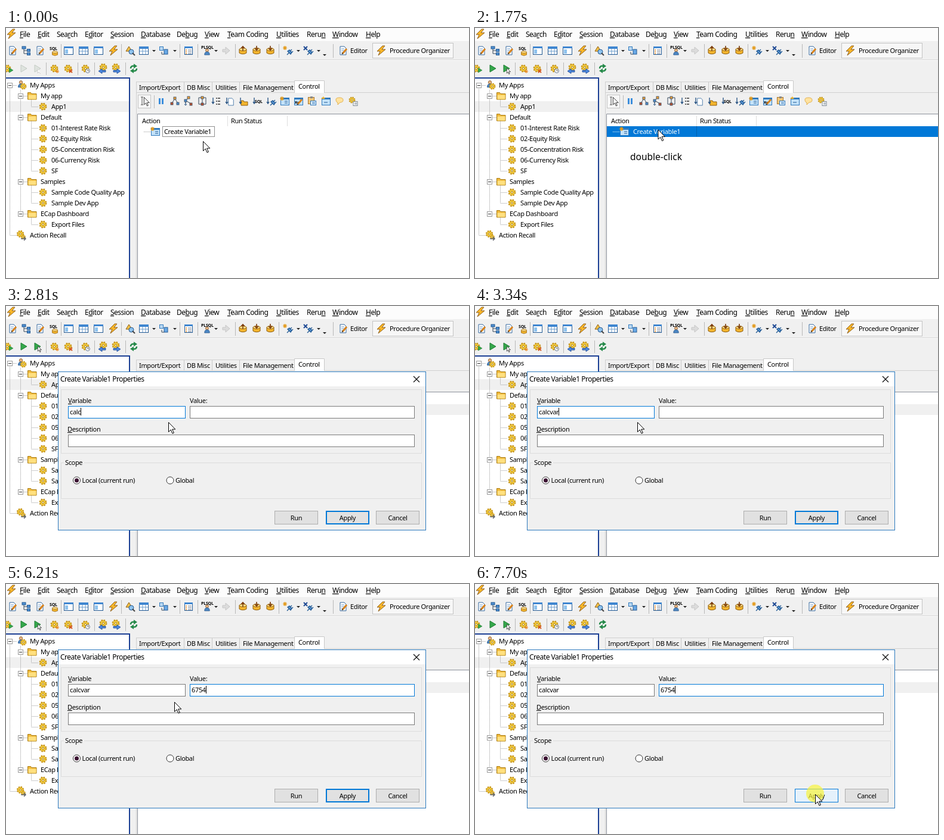
Write an HTML page that moves like this. It is 776 px wide and 420 px high and loops after 8 s.

```html
<!DOCTYPE html>
<html lang="en">
<head>
<meta charset="utf-8">
<title>Create variable</title>
<style>
  html, body { margin: 0; width: 100%; height: 100%; overflow: hidden; background: #f0f0f0; }
  svg { display: block; }
  text { font: 11px "Noto Sans", "Open Sans", sans-serif; letter-spacing: -.35px; white-space: pre; }
  .menu { font-size: 12px; letter-spacing: -.5px; }
  .note { font-size: 15.5px; letter-spacing: 0; }
  .tiny { font-size: 7px; font-weight: 700; letter-spacing: -.2px; }
  .u { text-decoration: underline; }
</style>
</head>
<body>
<svg id="stage" width="776" height="420" viewBox="0 0 776 420"></svg>
<script>
const LOOP = 8000;
const BLUE = '#0078d7', FACE = '#f0f0f0';

// ---- drawing helpers ----
const rect = (x, y, w, h, fill, stroke, extra = '') =>
  `<rect x="${x}" y="${y}" width="${w}" height="${h}" fill="${fill}" ${stroke ? `stroke="${stroke}"` : ''} ${extra}/>`;
const box = (x, y, w, h, fill, stroke, extra) => rect(x + .5, y + .5, w - 1, h - 1, fill, stroke, extra);
const path = (d, fill = 'none', stroke = 'none', width = 1, extra = '') =>
  `<path d="${d}" fill="${fill}" stroke="${stroke}" stroke-width="${width}" ${extra}/>`;
const disc = (x, y, r, fill, stroke = 'none') =>
  `<circle cx="${x}" cy="${y}" r="${r}" fill="${fill}" stroke="${stroke}"/>`;
// An ampersand in a label underlines the next letter.
const text = (x, y, label, extra = '') =>
  `<text x="${x}" y="${y}" ${extra}>${label.replace(/&(.)/, '<tspan class="u">$1</tspan>')}</text>`;
const group = (id, body) => `<g id="${id}">${body}</g>`;
const moved = (x, y, scale, body) => `<g transform="translate(${x} ${y}) scale(${scale})">${body}</g>`;
const vline = (x, y1, y2, color = '#b8b8b8') => path(`M${x + .5},${y1}V${y2}`, 'none', color);
const hline = (y, x1, x2, color = '#d5d5d5') => path(`M${x1},${y + .5}H${x2}`, 'none', color);

// ---- icons, centred on 0,0 in a 16 px cell ----
const tinyBox = (x, y, fill) => rect(x, y, 4, 4, fill, '#34465a', 'stroke-width=".8"');
const cylinder = path('M-6,-2v6q6,3.5 12,0v-6', '#f3b52e', '#8f5d0c') +
  '<ellipse cy="-2" rx="6" ry="2.4" fill="#ffe08a" stroke="#8f5d0c"/>';
const sheet = path('M-5,-7h7l3,3v11h-10z', '#fff', '#35699f');
const lines = path('M-3,-3h5m-5,3h6m-6,3h6', 'none', '#6d9ccb');
const pane = rect(-6.5, -5.5, 14, 12, '#c3e2f9', '#2f79bd') + rect(-7, -6, 15, 3, '#2f79bd');
const pencil = path('M-1,5L6,-3', 'none', '#d9821b', 3) + path('M-2,6l1.5,-2', 'none', '#333', 1.5);
const spark = path('M-4.5,-8v7m-3.5,-3.5h7m-6,-2.5l5,5m0,-5l-5,5', 'none', '#e39a1a', 1.2);
const gear = '<circle r="5" fill="none" stroke="#c9981c" stroke-width="3" stroke-dasharray="2.4 1.53"/>' +
  disc(0, 0, 4.6, '#f7cf3e', '#c9981c') + disc(0, 0, 1.7, '#fff8d8', '#a87a10');
const boltShape = path('M2,-8L-7,1h5L-5,8L7,-2H1L6,-8z', '#fbb829', '#8f5f1c');
const cursorShape = 'M.5,.5v16l3.7,-3.6l2.8,6.3l2.4,-1.1l-2.8,-6h5.2z';
const greenPlay = path('M-4,-6L6,0L-4,6z', '#35a84b', '#1f7a33');
const palePlay = path('M-4,-6L6,0L-4,6z', '#dfe4df', '#c3cac3');
const arrowRight = path('M-5,3h6v-2.5l6,4l-6,4v-2.5h-6z', '#4a86dd', '#1f4a94', .8);
const person = disc(0, -3, 3, '#e7b684', '#8b5d33') + path('M-5,6q0,-6 5,-6t5,6z', '#4c87c4', '#2c5c91');
const flow = path('M0,-4L-5,3M0,-4L5,3', 'none', '#34465a') +
  tinyBox(-2, -7, '#f0a23a') + tinyBox(-7, 2, '#c0532f') + tinyBox(3, 2, '#4f8fd0');
const sqlLabel = text(-7, -1, 'SQL', 'class="tiny"');
const plugShape = path('M-1,7l3,-3m-2,-3l5,5l2,-3l-4,-4zm4,0l3,-3m0,5l2,-2', '#5795d3', '#235a94', 1.4);
const leftArrow = path('M-5,-6v10m-2,-3l2,3l2,-3', 'none', '#234f80', 1.3);

const ICONS = {
  gear, pane, flow, sheet: sheet + lines, bolt: boltShape,
  folder: path('M-7.5,-5.5h5l1.5,2h8v9.5h-14.5z', '#f0b93a', '#a87a10') + path('M-6.5,-1.5h13v7h-13z', '#ffe080'),
  users: moved(-1, -2, .9, person) + moved(3, 2, .85, gear),
  recall: moved(-2, -2, .95, gear) + moved(3, 3, .6, gear) + path('M-1,6h8m-3,-3l3,3l-3,3', 'none', '#5b6068', 1.4),
  edit: sheet + lines + pencil,
  tree: path('M-4,-4v9h6m-6,-5h6', 'none', '#34465a') + rect(-7, -7, 6, 4, '#4f8fd0', '#235a94') +
    rect(1.5, -2.5, 5, 4, '#4f8fd0', '#235a94') + rect(1.5, 3.5, 5, 4, '#4f8fd0', '#235a94'),
  table: rect(-7.5, -6.5, 15, 13, '#fff', '#235a94') + rect(-8, -7, 16, 4, '#3f86d0') + path('M-7,1h14M-2,-3v9M3,-3v9', 'none', '#6d9ccb'),
  form: rect(-7.5, -6.5, 15, 13, '#fff', '#235a94') + rect(-8, -7, 16, 3, '#3f86d0') + rect(-6, -2, 5, 7, '#8fc3ee'),
  sqlDb: moved(2, 4, .75, cylinder) + sqlLabel,
  shapes: path('M-2,-7l5,8h-10z', '#f3c24a', '#8f5d0c') + disc(2, 2, 4, '#8fc3ee', '#235a94') + path('M4,4l4,4', 'none', '#444', 2),
  pair: rect(-7.5, -6.5, 6, 6, '#bcd9f2', '#2f79bd') + rect(0, -2, 6, 8, '#6aa9e6', '#235a94') + path('M-4,2v4h4', 'none', '#34465a'),
  list: rect(-6.5, -6.5, 13, 13, '#fff', '#235a94') + rect(-7, -7, 14, 3, '#3f86d0') + path('M-1,-1h6m-6,3h6m-6,3h6', 'none', '#64748b') + path('M-5,-1h2m-2,3h2m-2,3h2', 'none', '#e8851a', 1.6),
  plsql: moved(-1, 2, .85, person) + text(-11, -3, 'PLSQL', 'class="tiny"'),
  pale: path('M-6,-2h5v-4l7,6l-7,6v-4h-5z', '#dcdcdc', '#c6c6c6'),
  dbUp: cylinder + path('M0,0v-7m-3,3l3,-3l3,3', 'none', '#7a3b0c', 1.6),
  dbDown: cylinder + path('M0,-8v7m-3,-3l3,3l3,-3', 'none', '#7a3b0c', 1.6),
  plug: spark + plugShape,
  unplug: path('M-7,-7l6,6m0,-6l-6,6', 'none', '#1f4a94', 2) + plugShape,
  play: greenPlay,
  playGear: moved(-3, 0, 1, gear) + moved(3, 3, .65, greenPlay),
  palePlay, palePoint: palePlay + path('M1,0v8l2,-2l3,3', '#fff', '#ccc'),
  playPoint: greenPlay + moved(1, -1, .55, path(cursorShape, '#fff', '#333', 1.5)),
  gearNew: gear + path('M2,5h6m-3,-3v6m-2,-5l4,4m0,-4l-4,4', 'none', '#e8851a'),
  gearDelete: gear + path('M2,2l5,5m0,-5l-5,5', 'none', '#d4541c', 1.8),
  gearClock: gear + disc(4, 4, 3.4, '#fff', '#64748b') + path('M4,2v2h2', 'none', '#333', .8),
  gearRight: moved(-1, -2, 1, gear) + arrowRight,
  gearLeft: moved(1, -2, 1, gear) + `<g transform="scale(-1 1)">${arrowRight}</g>`,
  refresh: path('M-5,0q0,-5 6,-4M5,0q0,5 -6,4', 'none', '#268a4a', 2.5) + path('M0,-8l6,4l-6,4zM0,8l-6,-4l6,-4z', '#268a4a'),
  pointer: moved(-1, -7, .78, path(cursorShape, '#fff', '#333', 1.2)) + path('M-6,-7h4m-2,0v13m-2,0h4', 'none', '#555'),
  pause: path('M-2.5,-5v10m5,-10v10', 'none', '#3d8fdc', 3),
  branch: path('M0,-6L-5,-1v5M-5,-1L4,4', 'none', '#34465a') + tinyBox(-2, -8, '#f0a23a') + tinyBox(-7, -3, '#4f8fd0') +
    tinyBox(2, 3, '#c0532f') + path('M-5,2v5m-2,-2l2,2l2,-2', 'none', '#234f80'),
  loop: tinyBox(-2, -8, '#f0a23a') + tinyBox(-2, 3, '#c0532f') + path('M-2,-6h-4v11h4M0,-4v7M2,-6h4v11h-4', 'none', '#34465a'),
  steps: leftArrow + path('M0,-5h2m1,0h4M0,0h2m1,0h4M0,5h2m1,0h4', 'none', '#333', 1.5),
  sheetDown: moved(2, 1, .85, sheet) + leftArrow,
  folderDown: path('M-4,-1h4l1,2h6v6h-11z', '#f3b52e', '#8f5d0c') + leftArrow,
  sqlDown: text(-4, 3, 'SQL', 'class="tiny"') + leftArrow,
  plugDown: leftArrow + plugShape,
  newVar: pane + path('M0,0h5m-5,3h5', 'none', '#235a94') + spark,
  editVar: pane + text(-6, 4, 'x=', 'class="tiny"') + pencil,
  paste: rect(-6.5, -6.5, 10, 11, '#f3c879', '#a9752a') + rect(-3, -8, 4, 3, '#888') + rect(-2.5, -.5, 9, 7, '#e6f2fc', '#2f79bd') + path('M0,2h5m-5,2h5', 'none', '#2f79bd'),
  note: pane + path('M-8,-4l4,-4l3,4z', '#f3b52e') + path('M-3,2h6', 'none', '#235a94'),
  bubble: path('M-6,-3q0,-3 6,-3t6,4t-5,4l-4,4v-4q-3,0 -3,-5z', '#ffe3a0', '#e3b04f'),
  gearList: moved(-2, -2, .85, gear) + rect(0, .5, 7, 7, '#fff', '#7b8794') + path('M2,3h4m-4,2h4', 'none', '#7b8794'),
};
const icon = (name, x, y) => moved(x, y, 1, ICONS[name]);
const strip = (y, start, gap, names) =>
  names.split(' ').map((name, i) => icon(name, start + gap * i, y)).join('');
const drop = (x, y = 38) => path(`M${x - 3},${y - 1}h6l-3,3z`, '#222');

// ---- main window ----
function menuBar() {
  const items = { '&File': 23, '&Edit': 53, 'Sea&rch': 85, 'E&ditor': 132, '&Session': 175, '&Database': 226,
    'De&bug': 286, '&View': 333, '&Team Coding': 371, '&Utilities': 453, 'Reru&n': 504, '&Window': 547, '&Help': 603 };
  return rect(0, 0, 776, 22, '#fcfcfc') + icon('bolt', 9, 10) +
    Object.entries(items).map(([label, x]) => text(x, 15, label, 'class="menu"')).join('');
}

function toolbars() {
  const seps = [92, 193, 291, 321, 384, 457, 548].map(x => vline(x, 27, 50)).join('') +
    [67, 120, 148, 200].map(x => vline(x, 58, 79)).join('');
  return hline(53, 0, 776) + hline(54, 0, 776, '#fff') + seps +
    strip(38, 11, 23, 'edit tree edit sqlDb') + strip(38, 105, 25, 'form table form bolt') +
    icon('shapes', 208, 38) + icon('table', 231, 38) + drop(248) + icon('pair', 265, 38) + drop(283) +
    icon('list', 306, 38) + icon('plsql', 338, 38) + drop(352) + icon('pale', 369, 38) +
    strip(38, 397, 23, 'dbUp dbDown dbDown') + icon('plug', 472, 38) + drop(490) +
    icon('unplug', 506, 38) + drop(524) + drop(534, 45) +
    icon('edit', 565, 38) + text(577, 42, 'Editor') +
    box(614, 25, 136, 26, '#f7f7f7', '#c4c4c4') + icon('bolt', 629, 38) + text(643, 42, 'Procedure Organizer') +
    icon('playGear', 5, 68) +
    group('idle', icon('palePlay', 29, 68) + icon('palePoint', 52, 68)) +
    group('ready', icon('play', 29, 68) + icon('playPoint', 52, 68)) +
    strip(68, 81, 23, 'gearNew gearDelete') + icon('gearClock', 133, 68) +
    strip(68, 162, 23, 'gearLeft gearRight') + icon('refresh', 214, 68);
}

function tree() {
  const rows = [[0, 'My Apps', 'users'], [1, 'My app'], [2, 'App1'], [1, 'Default'],
    [2, '01-Interest Rate Risk'], [2, '02-Equity Risk'], [2, '05-Concentration Risk'],
    [2, '06-Currency Risk'], [2, 'SF'], [1, 'Samples'], [2, 'Sample Code Quality App'],
    [2, 'Sample Dev App'], [1, 'ECap Dashboard'], [2, 'Export Files'], [0, 'Action Recall', 'recall']];
  const dots = d => path(d, 'none', '#9a9a9a', 1, 'stroke-dasharray="1 1"');
  let out = rect(0, 84, 206, 336, '#fff') + path('M0,84H207V420', 'none', '#1c3f94', 2) +
    rect(0, 123, 206, 18, FACE) + dots('M6.5,100V348M24.5,104V312M42.5,120V132M42.5,156V240M42.5,264V294M42.5,318V330');
  rows.forEach(([level, label, name], i) => {
    const y = 96 + 18 * i, x = 6.5 + 18 * level;
    out += dots(`M${x},${y + .5}h11`);
    if (level === 1 || i === 0)
      out += box(x - 4.5, y - 4, 9, 9, '#fff', '#9a9a9a') + path(`M${x - 2.5},${y + .5}h5`, 'none', '#333');
    out += icon(name || (level === 1 ? 'folder' : 'gear'), 26 + 18 * level, y) + text(40 + 18 * level, y + 4, label);
  });
  return out;
}

function actionPane() {
  const tabs = { 'Import/Export': 223, 'DB Misc': 303, 'Utilities': 351, 'File Management': 397 };
  const row = color => icon('newVar', 250, 174) + text(265, 178, 'Create Variable1', `fill="${color}"`);
  const stub = color => path('M231,174.5h11', 'none', color, 1, 'stroke-dasharray="1 1"');
  return Object.entries(tabs).map(([label, x]) => text(x, 104, label)).join('') +
    box(218, 90, 266, 19, 'none', '#d0d0d0') + [298, 345, 391].map(x => vline(x, 91, 108, '#c8c8c8')).join('') +
    path('M218.5,420V108.5H776', 'none', '#d0d0d0') +
    rect(483, 88, 51, 21, '#fff') + path('M483.5,109V88.5H533.5V109', 'none', '#c8c8c8') + text(490, 102, 'Control') +
    box(221, 112, 22, 23, '#f7f7f7', '#c4c4c4') + icon('pointer', 232, 123) + vline(248, 113, 135) +
    strip(123, 260, 23, 'pause flow branch loop steps sheetDown folderDown sqlDown plugDown newVar editVar paste note bubble gearList') +
    rect(220, 144, 556, 276, '#fff') + path('M220.5,420V144.5H776', 'none', '#8a8f98') +
    text(228, 160, 'Action') + text(377, 160, 'Run Status') + vline(371, 147, 165, '#dedede') + vline(471, 147, 165, '#dedede') +
    group('focused', stub('#999') + box(262, 165, 88, 18, 'none', '#222', 'stroke-dasharray="1 1"') + row('#000')) +
    group('selected', rect(221, 165, 555, 18, BLUE) + stub('#fff') +
      path('M371.5,165v18', 'none', '#004b87', 1, 'stroke-dasharray="1 1"') + row('#fff')) +
    group('inactive', rect(221, 165, 555, 18, FACE) + row('#000')) +
    group('note', text(260, 222, 'double-click', 'class="note"'));
}

// ---- dialog ----
function dialog() {
  const caption = (x, label) => text(x + 36.5, 360, label, 'text-anchor="middle"');
  const button = (x, label) => box(x, 344, 73, 23, '#e1e1e1', '#adadad') + caption(x, label);
  const radio = (x, label) => disc(x, 293, 6, '#fff', '#333') + text(x + 9, 297, label);
  const field = (x, y, w, id = '') => box(x, y, w, 21, '#fff', '#7a7a7a', id && `id="${id}"`);
  return box(87, 110, 617, 267, FACE, '#2b79bd') + rect(88, 111, 615, 24, '#fff') +
    text(91, 127, 'Create Variable1 Properties', 'class="menu"') +
    path('M683,118l10,10m0,-10l-10,10', 'none', '#000', 1.1) +
    box(92, 140, 605, 108, 'none', '#dcdcdc') + box(92, 263, 605, 61, 'none', '#dcdcdc') +
    rect(97, 258, 34, 10, FACE) + text(99, 267, 'Scope') +
    text(104, 163, '&Variable') + text(308, 163, 'Value:') + text(103, 211, '&Description') +
    field(104, 168, 197, 'nameField') + field(308, 168, 377, 'valueField') + field(104, 216, 581) +
    text(107, 182, '', 'id="nameText"') + text(311, 182, '', 'id="valueText"') +
    rect(0, 171, 1, 13, '#000', '', 'id="caret"') +
    radio(118.5, 'Local (current run)') + disc(118.5, 293, 3.5, '#3a1030') + radio(275, 'Global') +
    button(450, 'Run') + button(620, 'Cancel') +
    group('applyDefault', rect(537, 345, 71, 21, '#e1e1e1', BLUE, 'stroke-width="2"')) +
    group('applyHover', box(536, 344, 73, 23, '#e5f1fb', BLUE)) + caption(536, 'Apply');
}

stage.innerHTML = rect(0, 0, 776, 420, FACE) + menuBar() + toolbars() + tree() + actionPane() +
  group('dialog', dialog()) +
  `<circle id="halo" r="15" fill="#f8f33c" opacity=".7"/>` +
  group('mouse', path(cursorShape, '#fff', '#000'));

// ---- timeline: [start ms, value] ----
const TRACKS = {
  mouse: [[0, [330, 190]], [70, [328, 188]], [170, [320, 181]], [270, [311, 174]], [370, [306.5, 170.5]],
    [1920, [304, 172]], [1990, [296, 178]], [2060, [286, 186]], [2140, [278, 192]], [2210, [273, 195]], [2280, [272, 195]],
    [6210, [282, 198]], [6280, [318, 208]], [6350, [376, 227]], [6420, [447, 255]], [6480, [513, 282]],
    [6550, [560, 303]], [6620, [584, 315]], [6690, [589, 319]], [6760, [583, 332]], [6870, [574, 345]],
    [6970, [570, 349.5]], [7040, [570, 351]], [7100, [570, 353]]],
  halo: [[0, 0], [1220, [306, 170]], [1420, 0], [1570, [306, 170]], [1770, 0], [7700, [570, 352]]],
  note: [[0, 0], [270, 1], [1850, 0]],
  row: [[0, 'focused'], [1420, 'selected'], [1850, 'inactive']],
  dialog: [[0, 0], [1850, .6], [1920, 1]],
  name: [[0, ''], [2540, 'c'], [2630, 'ca'], [2720, 'cal'], [2810, 'calc'], [3150, 'calcv'], [3240, 'calcva'], [3340, 'calcvar']],
  value: [[0, ''], [5200, '6'], [5330, '67'], [5530, '675'], [5600, '6754']],
  active: [[0, 'name'], [4610, 'value']],
  hover: [[0, 0], [6870, 1]],
};
const at = (track, t) => TRACKS[track].findLast(([start]) => start <= t)[1];
const el = id => document.getElementById(id);
const show = (id, visible) => el(id).setAttribute('visibility', visible ? 'visible' : 'hidden');
const place = (id, [x, y]) => el(id).setAttribute('transform', `translate(${x} ${y})`);

function render(t) {
  const row = at('row', t), halo = at('halo', t), active = at('active', t), hover = at('hover', t);
  for (const state of ['focused', 'selected', 'inactive']) show(state, state === row);
  show('idle', row === 'focused');
  show('ready', row !== 'focused');
  show('note', at('note', t));
  show('halo', halo);
  if (halo) place('halo', halo);
  place('mouse', at('mouse', t));
  el('dialog').setAttribute('opacity', at('dialog', t));
  for (const id of ['name', 'value']) {
    el(id + 'Text').textContent = at(id, t);
    el(id + 'Field').setAttribute('stroke', id === active ? BLUE : '#7a7a7a');
  }
  const typed = at(active, t) ? el(active + 'Text').getComputedTextLength() : 0;
  el('caret').setAttribute('x', Math.round((active === 'name' ? 107 : 311) + typed));
  show('applyDefault', !hover);
  show('applyHover', hover);
}

const start = performance.now();
function tick() {
  render((performance.now() - start) % LOOP);
  requestAnimationFrame(tick);
}
tick();
</script>
</body>
</html>
```
